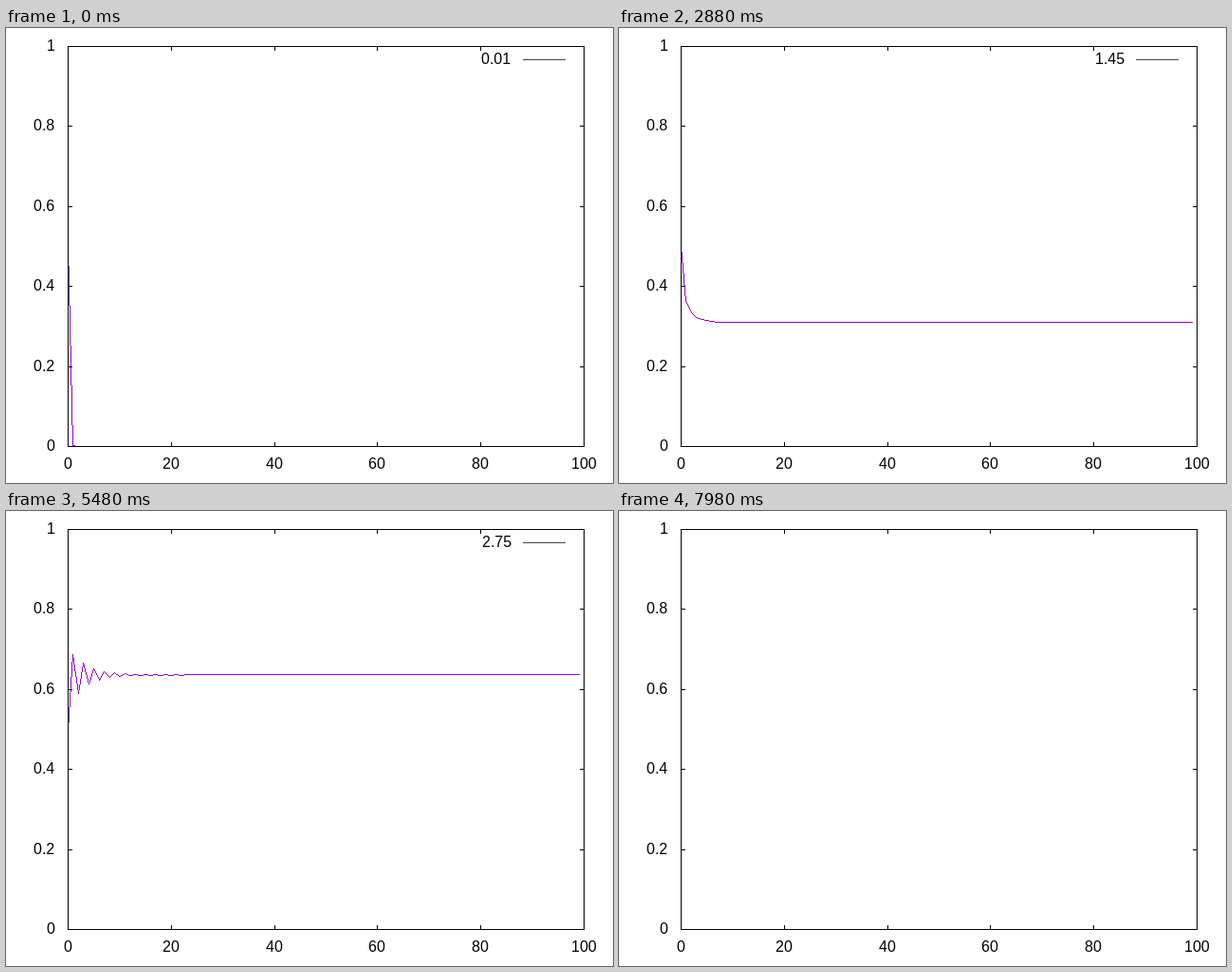
These frames come from a looping animation (640 by 480 pixels, 8000 ms). An HTML page:

```html
<!DOCTYPE html>
<html lang="en">
<head>
<meta charset="utf-8">
<title>Logistic map</title>
<style>
  html, body { margin: 0; width: 100%; height: 100%; overflow: hidden; background: #fff; }
  svg { display: block; }
  path { shape-rendering: crispEdges; }
  text { font: 16px "Liberation Sans", Arial, sans-serif; }
</style>
</head>
<body>
<svg width="640" height="480" viewBox="0 0 640 480">
  <path id="curve" fill="#9400d3"/>
  <path id="axes" fill="none" stroke="#000"/>
  <g id="labels"></g>
  <g id="legend">
    <text id="rate" y="38"></text>
    <path d="M545 33.5H590" stroke="#444"/>
  </g>
</svg>
<script>
const LEFT = 65, RIGHT = 609, TOP = 19, BOTTOM = 441;
const STEP_MS = 20, STEPS = 400, POINTS = 100;
const $ = id => document.getElementById(id);
const toX = n => Math.round(LEFT + (RIGHT - LEFT) * n / 100);
const toY = v => Math.round(BOTTOM - (BOTTOM - TOP) * v);

function addLabel(x, y, value) {
  const text = document.createElementNS("http://www.w3.org/2000/svg", "text");
  text.setAttribute("x", x);
  text.setAttribute("y", y);
  text.textContent = value;
  $("labels").append(text);
}

function drawAxes() {
  let d = `M${LEFT + .5} ${TOP + .5}H${RIGHT + .5}V${BOTTOM + .5}H${LEFT + .5}Z`;
  for (let i = 0; i <= 5; i++) {
    const x = toX(i * 20), y = toY(i / 5);
    const name = String(i * 20), value = String(i / 5);
    d += `M${x + .5} ${TOP}v5M${x + .5} ${BOTTOM + 1}v-5`;
    d += `M${LEFT} ${y + .5}h5M${RIGHT + 1} ${y + .5}h-5`;
    addLabel(Math.round(x - name.length * 4.45), 465, name);
    addLabel(value.length > 1 ? 29 : 43, y + 5, value);
  }
  $("axes").setAttribute("d", d);
}

// One-pixel line without smoothing, as a chain of straight pixel runs.
function pixelLine(x0, y0, x1, y1) {
  const steep = Math.abs(y1 - y0) > Math.abs(x1 - x0);
  let [a0, b0, a1, b1] = steep ? [y0, x0, y1, x1] : [x0, y0, x1, y1];
  if (a0 > a1) [a0, b0, a1, b1] = [a1, b1, a0, b0];
  const minor = a => Math.round(b0 + (b1 - b0) * (a - a0) / (a1 - a0 || 1));
  let d = "", start = a0;
  for (let a = a0; a <= a1; a++) {
    const b = minor(a);
    if (a < a1 && minor(a + 1) === b) continue;
    const size = a + 1 - start;
    d += steep ? `M${b} ${start}h1v${size}h-1z` : `M${start} ${b}h${size}v1h-${size}z`;
    start = a + 1;
  }
  return d;
}

function curvePath(r) {
  let d = "", v = 0.5;
  for (let n = 1; n < POINTS; n++) {
    const next = r * v * (1 - v);
    d += pixelLine(toX(n - 1), toY(v), toX(n), toY(next));
    v = next;
  }
  return d;
}

let shown = -1;
function render(ms) {
  const step = Math.floor(ms / STEP_MS) % STEPS;
  if (step === shown) return;
  shown = step;
  const empty = step === STEPS - 1;
  const r = (step + 1) / 100;
  $("legend").style.display = empty ? "none" : "";
  $("curve").setAttribute("d", empty ? "" : curvePath(r));
  $("rate").textContent = r.toFixed(2);
  $("rate").setAttribute("x", r >= 1 && r < 3 ? 502 : 501);
}

function tick() {
  render(performance.now());
  requestAnimationFrame(tick);
}

drawAxes();
tick();
</script>
</body>
</html>
```
